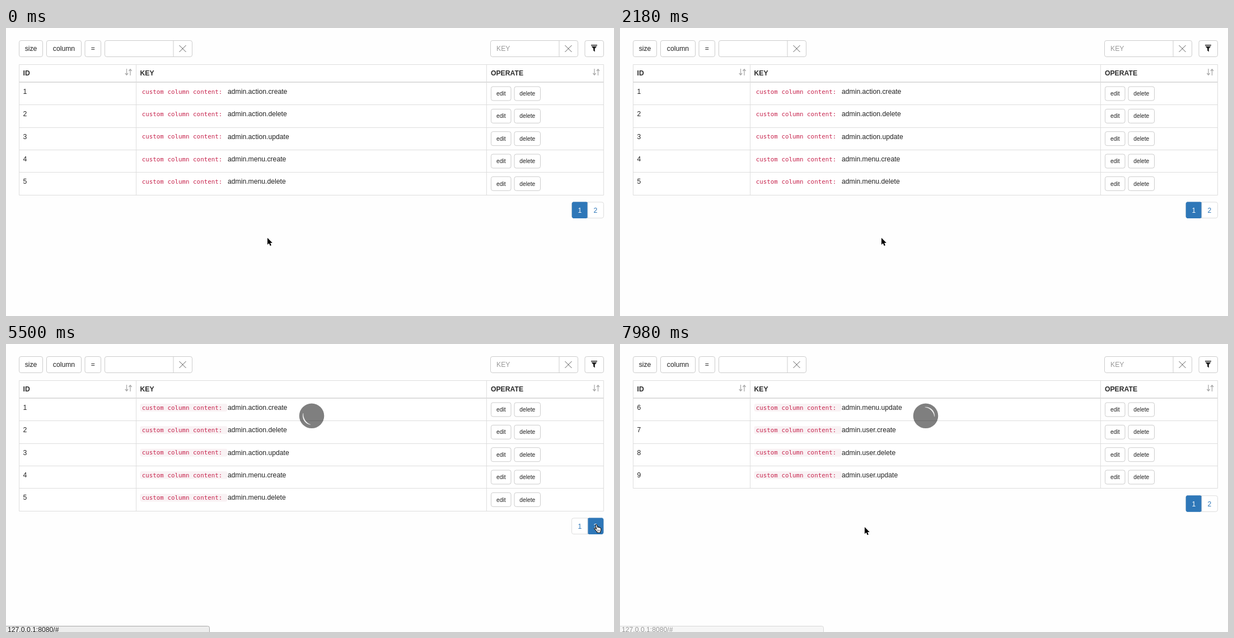
An HTML page for the animation above (8000 ms loop, 1086x516 px).

```html
<!DOCTYPE html>
<html lang="en">
<head>
<meta charset="utf-8">
<title>Data table</title>
<style>
html, body { margin: 0; width: 100%; height: 100%; overflow: hidden; background: #fefefe; }
svg { display: block; width: 100%; height: 100%; }
text { font-family: "Liberation Sans", Arial, sans-serif; font-size: 12.2px; fill: #222; white-space: pre; }
.code { font-family: "DejaVu Sans Mono", monospace; font-size: 10.85px; fill: #c7254e; }
.bold { font-weight: bold; fill: #2b2b2b; }
.small { font-size: 10.3px; }
.mid { text-anchor: middle; }
</style>
</head>
<body>
<svg id="stage" viewBox="0 0 1086 516"></svg>
<script>
const LOOP = 8000, ROW = 40.35, TOP = 97;
const KEYS = ['action', 'menu', 'user'].flatMap(o => ['create', 'delete', 'update'].map(v => `admin.${o}.${v}`));

// Pointer steps: time, x, y, shape
const POINTER = [
  [0, 467, 376, 'arrow'], [2810, 343, 238, 'arrow'], [2960, 272, 137, 'arrow'],
  [3230, 255, 122, 'arrow'], [3340, 248, 98, 'arrow'], [3430, 258, 79, 'arrow'],
  [3700, 330, 88, 'arrow'], [3780, 410, 95, 'arrow'], [3870, 486, 102, 'arrow'],
  [4050, 600, 120, 'arrow'], [4140, 730, 150, 'arrow'], [4220, 860, 180, 'arrow'],
  [4310, 983, 208, 'arrow'], [4490, 1010, 240, 'arrow'], [4600, 1045, 280, 'arrow'],
  [4700, 1054, 302, 'arrow'], [4820, 1050, 323, 'hand'],
  [6860, 1044, 310, 'hand'], [6960, 1033, 296, 'hand'], [7060, 1022, 284, 'hand'], [7150, 1019, 282, 'hand'],
  [7700, 900, 305, 'arrow'], [7790, 700, 320, 'arrow'], [7890, 520, 330, 'arrow'], [7980, 437, 328, 'arrow']
];

// Loading periods: shown from, first step, last step, step count, hidden at
const LOADS = [
  [1160, 1310, 2090, 10, 2180],
  [5380, 5380, 6140, 9, 6320],
  [7420, 7420, 7980, 7, LOOP]
];

const rect = (x, y, w, h, fill, stroke = 'none', r = 0) =>
  `<rect x="${x}" y="${y}" width="${w}" height="${h}" rx="${r}" fill="${fill}" stroke="${stroke}"/>`;
const text = (x, y, s, cls = '', fill = '') =>
  `<text x="${x}" y="${y}" class="${cls}"${fill && ` style="fill:${fill}"`}>${s}</text>`;
const path = (d, stroke, width = 1, fill = 'none', more = '') =>
  `<path d="${d}" fill="${fill}" stroke="${stroke}" stroke-width="${width}" ${more}/>`;
const button = (x, y, w, h, label, cls = '') =>
  rect(x, y, w, h, '#fff', '#ccc', 3.4) + text(x + w / 2, y + h / 2 + (cls ? 3.6 : 4.3), label, 'mid ' + cls);
const cross = (x, y) => path(`M${x - 6} ${y - 6}l12 12m0-12l-12 12`, '#444', 0.9);

function searchBox(x, hint) {
  return rect(x, 22.5, 156, 29, '#fff', '#ccc', 3.4) + path(`M${x + 122.5} 22.5v29`, '#ccc') +
    text(x + 10.5, 41.2, hint, '', '#999') + cross(x + 139, 37);
}

const sortIcon = x => path(`M${x} 73v11m-2.6-3l2.6 3.2l2.6-3.2M${x + 6.5} 85v-11m-2.6 3l2.6-3.2l2.6 3.2`, '#aaa', 1.3);

function toolbar() {
  return button(23.5, 22.5, 42, 29, 'size') + button(72.5, 22.5, 62, 29, 'column') +
    button(141, 22.5, 28.5, 29, '=') + searchBox(176.5, '') + searchBox(865.5, 'KEY') +
    button(1034, 22.5, 33.5, 29, '') +
    path('M1045 30h11v1.6h-11zM1045.6 32.8h9.8l-3.5 4.2v5.4l-2.8-1.8v-3.6z', 'none', 0, '#222');
}

function table(first, count, hover, tinted) {
  const bottom = TOP + count * ROW;
  let out = rect(23.5, 65.5, 1044, bottom - 65.5, '#fff');
  for (let i = 0; i < count; i++) {
    const y = TOP + i * ROW, id = first + i;
    if (i === hover) out += rect(24, y + 1, 1043, ROW - 1, '#f3f3f3');
    if (tinted) out += rect(239.5, y + 10, 156, 14, '#f9f2f4', 'none', 3.4);
    out += text(30.5, y + 21, id) + text(242.7, y + 20.6, 'custom column content:', 'code') +
      text(396, y + 21, KEYS[id - 1]) +
      button(866.5, y + 8, 35.5, 25, 'edit', 'small') + button(908, y + 8, 46.5, 25, 'delete', 'small') +
      path(`M23.5 ${Math.round(y + ROW) + 0.5}H1067.5`, '#ddd');
  }
  const end = Math.round(bottom) + 0.5;
  out += path(`M23.5 ${end}V65.5H1067.5V${end}M232.5 65.5V${end}M858.5 65.5V${end}`, '#ddd') +
    path('M23.5 97H1067.5', '#ddd', 2);
  return out + text(30.5, 85, 'ID', 'bold') + text(239.5, 85, 'KEY', 'bold') + text(866, 85, 'OPERATE', 'bold') +
    sortIcon(215.5) + sortIcon(1051);
}

function pager(y, active, hover) {
  const page = n => {
    const x = n === 1 ? 1010.5 : 1039, on = n === active;
    return on ? rect(x, y, 28.5, 28.5, '#2e77b8') : n === hover ? rect(x, y, 28.5, 28.5, '#eee') : '';
  };
  const label = n => text(n === 1 ? 1024.8 : 1053, y + 18.8, n, 'mid', n === active ? '#fff' : '#2e77b8');
  const x = active === 1 ? 1010.5 : 1039;
  return `<clipPath id="round">${rect(1010.5, y, 57, 28.5, '#000', 'none', 3.4)}</clipPath>` +
    rect(1010.5, y, 57, 28.5, '#fff', '#ddd', 3.4) + `<g clip-path="url(#round)">${page(1)}${page(2)}</g>` +
    path(`M1039 ${y}v28.5`, '#ddd') + path(`M${x + 2} ${y}h24.5m-24.5 28.5h24.5`, '#2e77b8') + label(1) + label(2);
}

function spinner(t) {
  const load = LOADS.find(l => t >= l[0] && t < l[4]);
  if (!load) return '';
  const [shown, from, to, steps] = load, gap = (to - from) / (steps - 1);
  const step = Math.min(steps - 1, Math.floor((t - from) / gap + 1e-6));
  const at = step < 0 ? shown : from + step * gap;
  const angle = 90 + 0.36 * (at - shown + 65);
  return `<circle cx="546" cy="128.8" r="22.3" opacity=".5"/>` +
    path('M10.2-12.1A15.8 15.8 0 0 1 10.2 12.1A20 20 0 0 0 10.2-12.1Z', '#fff', 0.3, '#fff',
      `transform="translate(546 128.8) rotate(${angle})"`);
}

function pointer([, x, y, shape]) {
  const body = shape === 'arrow'
    ? path('M0 0V12.2L2.8 9.6L4.8 14.2L6.9 13.3L5 8.9H8.8Z', '#fff', 1, '#000', 'paint-order="stroke"')
    : path('M4.6 8.4L3.2 2.4Q3 .6 4.3.6Q5.4.6 5.8 2L6.8 5.2Q8 4.4 8.8 5.6Q10 5 10.6 6.3Q12.3 5.8 12.6 7.6L12.8 10.4Q12.6 12 11.8 13V15H5.8V13.6Q4 12 2.8 10.2L.8 8.2Q.4 6.6 1.8 6.6Q3 6.8 4.6 8.4Z', '#111', 1.1, '#fff') +
      path('M6.6 9.6v3M8.4 9.6v3M10.2 9.6v3', '#333', 0.7);
  return `<g transform="translate(${x} ${y})">${body}</g>`;
}

function statusBar(t) {
  const alpha = t < 4920 ? 0 : t < 5030 ? 0.5 : t < 7980 ? 1 : 0.45;
  return alpha && `<g opacity="${alpha}">` +
    rect(-2, 505.5, 365.5, 20, '#ededed', '#a8a8a8', 3) + text(3, 516.3, '127.0.0.1:8080/#') + '</g>' || '';
}

function draw(t) {
  const cursor = POINTER.findLast(p => p[0] <= t), [, x, y, shape] = cursor;
  const blank = t >= 900 && t < 2180;
  const second = t >= 6230, count = second ? 4 : 5;
  const active = t >= 5380 && t < 7420 ? 2 : 1;
  const tinted = t >= 2960 && t < 6230 || t >= 6860;
  // The last row keeps its highlight briefly after the pointer leaves it
  const hover = shape === 'hand' || y < TOP || y > 305 ? -1 : Math.min(4, Math.floor((y - TOP) / ROW));
  const link = shape === 'hand' ? (x < 1039 ? 1 : second ? 0 : 2) : 0;
  const page = blank ? rect(23, 22, 1045, 319, '#fff')
    : toolbar() + table(second ? 6 : 1, count, hover, tinted) + pager(second ? 271.8 : 312, active, link);
  return page + spinner(t) + statusBar(t) + pointer(cursor);
}

const stage = document.getElementById('stage');
const start = performance.now();
let last = '';
function tick() {
  const next = draw((performance.now() - start) % LOOP);
  if (next !== last) stage.innerHTML = last = next;
  requestAnimationFrame(tick);
}
tick();
</script>
</body>
</html>
```
